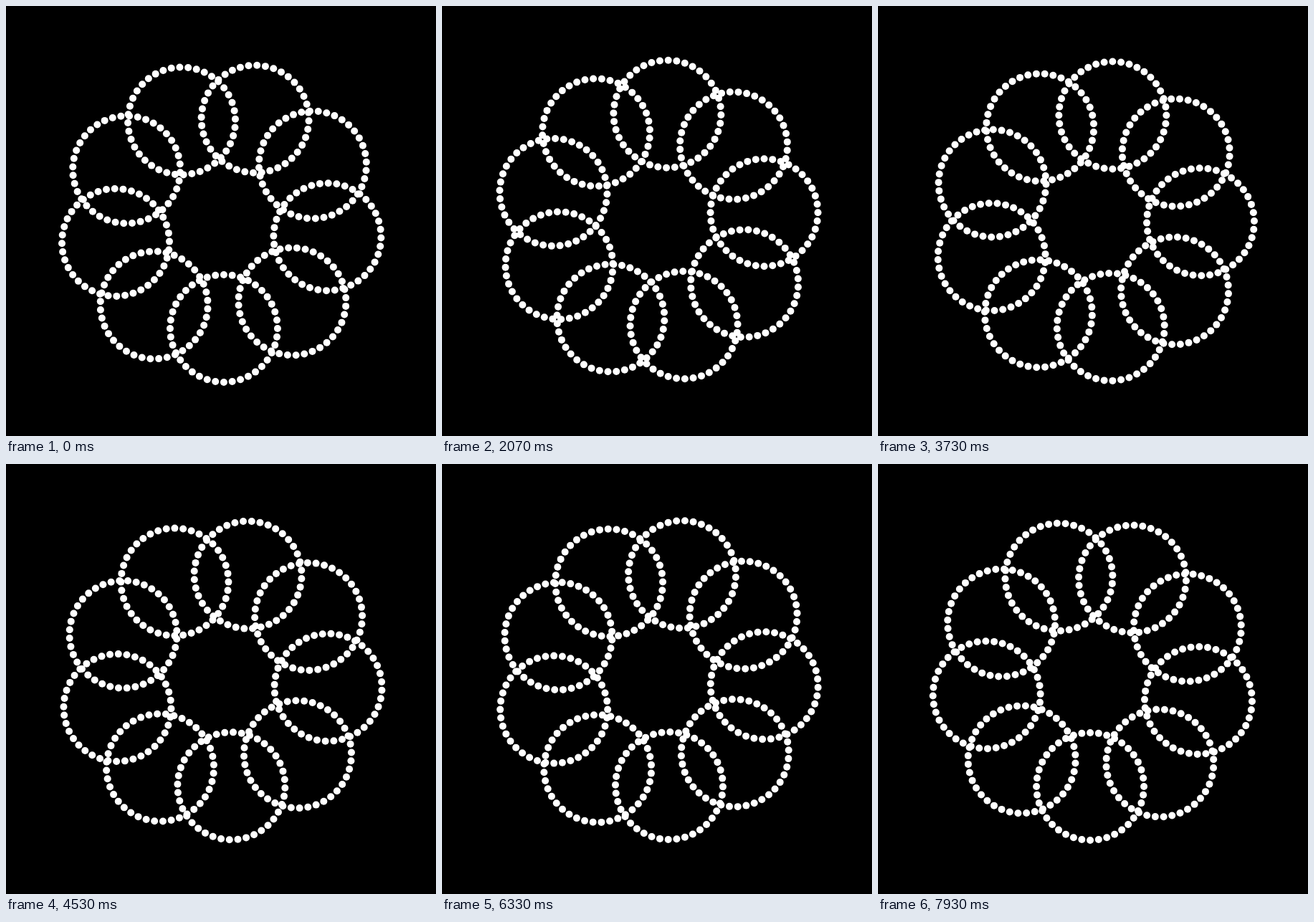
These frames come from a looping animation (600x600 px, 7.96 s). An HTML page with a canvas:

```html
<!DOCTYPE html>
<html lang="en">
<head>
<meta charset="utf-8">
<title>Dotted rings</title>
<style>
  html, body { margin: 0; width: 100%; height: 100%; overflow: hidden; background: #000; }
  canvas { display: block; }
</style>
</head>
<body>
<canvas id="stage" width="600" height="600"></canvas>
<script>
const ctx = document.getElementById('stage').getContext('2d');
const LOOP = 7960;
const CENTER = 300, ORBIT = 150, RING = 75, DOT = 5;
const RINGS = 9, DOTS = 40, STEPS = 240;
const TAU = Math.PI * 2;

// Three steps per 100 ms, starting at 0, 30 and 70.
function stepAt(ms) {
  const rest = ms % 100;
  return 3 * Math.floor(ms / 100) + (rest >= 70 ? 2 : rest >= 30 ? 1 : 0);
}

function draw(step) {
  ctx.fillStyle = '#000';
  ctx.fillRect(0, 0, 600, 600);
  ctx.fillStyle = '#fff';
  const turn = TAU * (step + 1) / STEPS;
  for (let k = 0; k < RINGS; k++) {
    const home = TAU * k / RINGS;
    const cx = CENTER + ORBIT * Math.sin(home + turn);
    const cy = CENTER + ORBIT * Math.cos(home + turn);
    // Rings travel around the centre but keep their own orientation.
    for (let j = 0; j < DOTS; j++) {
      const a = home + TAU * j / DOTS;
      ctx.beginPath();
      ctx.arc(cx + RING * Math.sin(a), cy + RING * Math.cos(a), DOT, 0, TAU);
      ctx.fill();
    }
  }
}

const start = performance.now();
function tick() {
  draw(stepAt((performance.now() - start) % LOOP));
  requestAnimationFrame(tick);
}
tick();
</script>
</body>
</html>
```
